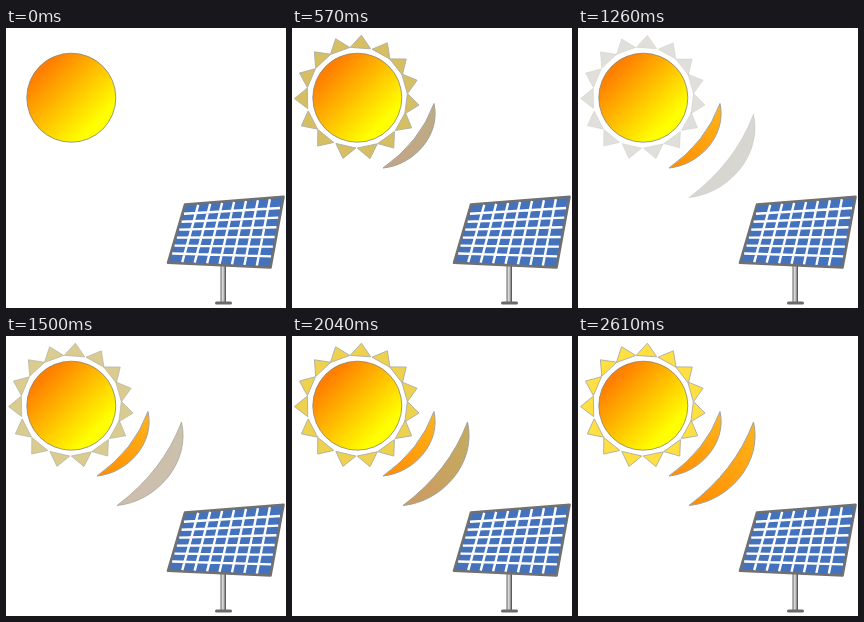
Animation, 280 px wide and 280 px high, one loop 2.67 s. Source, as an HTML page:

```html
<!DOCTYPE html>
<html lang="en">
<head>
<meta charset="utf-8">
<title>Sunlight on a solar panel</title>
<style>
html, body { margin: 0; width: 100%; height: 100%; overflow: hidden; background: #fff; }
svg { display: block; width: 100vw; height: 100vh; }
</style>
</head>
<body>
<svg viewBox="0 0 280 280">
  <defs>
    <linearGradient id="sun" x1="0.1" y1="0.1" x2="0.9" y2="0.9">
      <stop offset="0.1" stop-color="#ff7f00"/>
      <stop offset="0.85" stop-color="#ff0"/>
    </linearGradient>
    <linearGradient id="pole">
      <stop stop-color="#666"/>
      <stop offset="0.4" stop-color="#e4e4e4"/>
      <stop offset="0.65" stop-color="#aaa"/>
      <stop offset="1" stop-color="#444"/>
    </linearGradient>
    <linearGradient id="glow1" x1="0" y1="1" x2="1" y2="0"><stop/><stop offset="1"/></linearGradient>
    <linearGradient id="glow2" x1="0" y1="1" x2="1" y2="0"><stop/><stop offset="1"/></linearGradient>
  </defs>

  <path id="rays" stroke="#b4b3a4" stroke-linejoin="round"/>
  <circle cx="65.3" cy="69.7" r="44.5" fill="url(#sun)" stroke="#85827c" stroke-width="0.8"/>
  <g stroke="#a2a29a" stroke-linejoin="round">
    <path id="arc1" d="M91 140C122 137 149 107 142 75.5Q128 114 91 140Z" fill="url(#glow1)"/>
    <path id="arc2" d="M111 169.5C150 166 185 127 175.5 86Q157 135 111 169.5Z" fill="url(#glow2)"/>
  </g>

  <rect x="214.5" y="237" width="5.5" height="38" fill="url(#pole)"/>
  <rect x="209" y="273.5" width="17" height="3" rx="1.5" fill="#6a6a6a"/>
  <path d="M179 176.5L277.5 168.8L264.5 239.5L162 234.8Z" fill="#4472bd" stroke="#707070" stroke-width="2.6" stroke-linejoin="round"/>
  <path id="grid" fill="none" stroke="#fff" stroke-width="2.4"/>
</svg>
<script>
const LOOP = 2670;
const $ = id => document.getElementById(id);

// Sun rays, by clockwise angle from the top
const SUN = [65, 69.5];
const polar = (deg, r, side = 0) => {
  const a = deg * Math.PI / 180, s = Math.sin(a), c = Math.cos(a);
  return [SUN[0] + r * s + side * c, SUN[1] - r * c + side * s].map(v => v.toFixed(2)).join(' ');
};
const angles = [4, 29, 52, 74, 97, 119, 144, 168, 193, 219, 243, 269, 293, 317, 340];
$('rays').setAttribute('d', angles.map(a =>
  `M${polar(a, 62.5)}L${polar(a, 49.5, 10.3)}L${polar(a, 49.5, -10.3)}Z`).join(''));

// Panel grid, interpolated between the four inner corners
const mix = (a, b, k) => a.map((v, i) => v + (b[i] - v) * k);
const [TL, TR, BR, BL] = [[180.3, 177.8], [275.8, 170.3], [263.3, 238], [163.8, 233.5]];
const COLS = 8, ROWS = 7;
let grid = '';
for (let i = 1; i < COLS; i++) grid += `M${mix(TL, TR, i / COLS)}L${mix(BL, BR, i / COLS)}`;
for (let i = 1; i < ROWS; i++) grid += `M${mix(TL, BL, i / ROWS)}L${mix(TR, BR, i / ROWS)}`;
$('grid').setAttribute('d', grid);

// Colour tracks: [ms, [r, g, b]]
const WHITE = [255, 255, 255], SILVER = [224, 223, 219], GOLD = [214, 190, 98], YELLOW = [255, 224, 64];
const GREY = [216, 214, 208];
const rayTrack = [
  [60, WHITE], [180, SILVER], [570, GOLD], [870, [218, 194, 90]], [1110, YELLOW],
  [1140, YELLOW], [1140, WHITE], [1260, SILVER], [1650, GOLD], [1800, [216, 192, 96]], [2220, YELLOW]
];

// Each arc runs from pale to full colour at both ends of its gradient
const LOW = { tan: [196, 164, 136], warm: [212, 146, 72], full: [255, 140, 4] };
const HIGH = { tan: [188, 172, 132], warm: [200, 172, 66], full: [255, 180, 24] };
const arcTrack = ({ tan, warm, full }, [start, toTan, toWarm, end]) =>
  [[start, WHITE], [start + 120, GREY], [toTan, tan], [toWarm, warm], [end, full]];
const ARC1 = [60, 570, 870, 1140], ARC2 = [1140, 1750, 2250, 2610];

function colorAt(track, t) {
  const next = track.findIndex(([time]) => time > t);
  if (next === 0) return track[0][1];
  if (next < 0) return track[track.length - 1][1];
  const [t0, c0] = track[next - 1], [t1, c1] = track[next];
  return mix(c0, c1, (t - t0) / (t1 - t0));
}
const css = c => `rgb(${c.map(Math.round)})`;
const fade = (t, start) => Math.max(0, Math.min(1, (t - start) / 510));

function show(id, opacity) {
  $(id).style.visibility = opacity > 0 ? 'visible' : 'hidden';
  $(id).setAttribute('stroke-opacity', opacity);
}
function paintArc(n, times, t) {
  show('arc' + n, fade(t, times[0]));
  const [low, high] = $('glow' + n).children;
  low.setAttribute('stop-color', css(colorAt(arcTrack(LOW, times), t)));
  high.setAttribute('stop-color', css(colorAt(arcTrack(HIGH, times), t)));
}

function draw() {
  const t = performance.now() % LOOP;
  show('rays', fade(t, t < 1140 ? 60 : 1140));
  $('rays').setAttribute('fill', css(colorAt(rayTrack, t)));
  paintArc(1, ARC1, t);
  paintArc(2, ARC2, t);
  requestAnimationFrame(draw);
}
draw();
</script>
</body>
</html>
```
